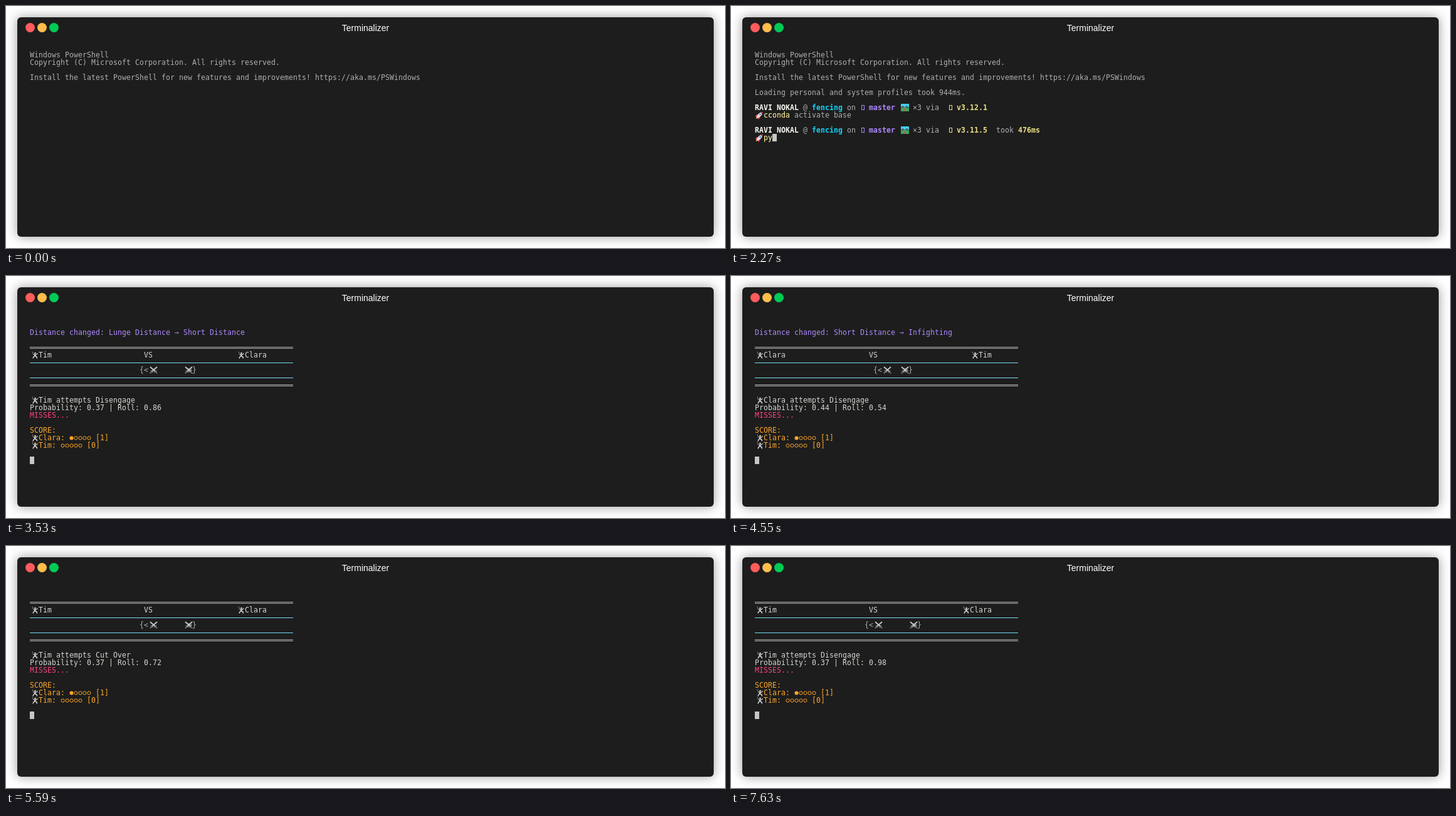
An HTML page with a canvas for the animation above (8 s loop, 1147 px wide and 386 px high).

```html
<!DOCTYPE html>
<html lang="en">
<head>
<meta charset="utf-8">
<title>Terminalizer</title>
<style>
html, body { margin: 0; width: 100%; height: 100%; overflow: hidden; background: #fff; }
#window { position: absolute; left: 18px; top: 18px; width: 1111px; height: 350px;
  border-radius: 6px; background: #1d1d1d; box-shadow: 0 0 18px rgba(0, 0, 0, .4); }
#title { position: absolute; top: 9px; width: 100%; text-align: center; color: #fff;
  font: 14px/16px "Liberation Sans", Arial, sans-serif; }
i { position: absolute; top: 9px; width: 15px; height: 15px; border-radius: 50%; }
canvas { position: absolute; left: 0; top: 0; }
</style>
</head>
<body>
<div id="window">
  <div id="title">Terminalizer</div>
  <i style="left:13px;background:#ff5c5c"></i>
  <i style="left:32px;background:#ffbd4c"></i>
  <i style="left:51px;background:#00ca56"></i>
</div>
<canvas width="1147" height="386"></canvas>
<script>
const ctx = document.querySelector('canvas').getContext('2d');
const LOOP = 8000, CELL = 7, LINE = 12, LEFT = 38, TOP = 72;
const FONT = '11.5px "DejaVu Sans Mono", "Noto Sans Mono", monospace';
const GREY = '#afafaf', WHITE = '#d5d5d0', BRIGHT = '#f9f9f4', CYAN = '#75dff2', SKY = '#0fd2fa',
  PURPLE = '#ae89fe', YELLOW = '#ebdf86', ORANGE = '#ffa727', RED = '#fc4384', GREEN = '#b3e33b';
const USER = 'RAVI NOKAL', ONE = 'Clara', TWO = 'Tim';

function shape(color, ...pts) {
  ctx.fillStyle = color;
  ctx.beginPath();
  pts.forEach(p => ctx.lineTo(...p));
  ctx.fill();
}

function stroke(color, width, ...pts) {
  ctx.strokeStyle = color;
  ctx.lineWidth = width;
  ctx.beginPath();
  pts.forEach(p => ctx.lineTo(...p));
  ctx.stroke();
}

function disc(color, x, y, rx, ry = rx) {
  ctx.fillStyle = color;
  ctx.beginPath();
  ctx.ellipse(x, y, rx, ry, 0, 0, 7);
  ctx.fill();
}

// Glyphs drawn by hand, with the cell's top left corner as the zero point
const glyphs = {
  '═': c => { ctx.fillStyle = c; ctx.fillRect(0, 5, CELL, 1); ctx.fillRect(0, 7, CELL, 1); },
  '─': c => { ctx.fillStyle = c; ctx.fillRect(0, 6, CELL, 1); },
  '▯': c => { ctx.strokeStyle = c; ctx.lineWidth = 1; ctx.strokeRect(2.5, 2.5, 4, 7); },
  '█': c => { ctx.fillStyle = c; ctx.fillRect(0, 0, CELL, LINE); },
  '●': c => disc(c, 3.5, 6.5, 3),
  '○': c => {
    ctx.strokeStyle = c;
    ctx.lineWidth = 1;
    ctx.beginPath();
    ctx.arc(3.5, 6.5, 2.6, 0, 7);
    ctx.stroke();
  },
  '🚀': () => {
    ctx.translate(7.5, 6);
    ctx.rotate(Math.PI / 4);
    shape('#e0384f', [-1.5, 0], [-4, 3], [-3.5, 6], [3.5, 6], [4, 3], [1.5, 0]);
    shape('#ffb02e', [-1.5, 5], [0, 8.5], [1.5, 5]);
    disc('#dedee6', 0, 0, 2.6, 6);
    shape('#e0384f', [-1.8, -4], [0, -7.5], [1.8, -4]);
    disc('#3f6f91', 0, -1.5, 1.2);
  },
  '🏞': () => {
    shape('#43cdf2', [2, 0], [15, 0], [15, 12], [2, 12]);
    shape('#4d5560', [2, 6], [5, 3], [8, 6], [11, 3], [15, 6], [15, 8], [2, 8]);
    shape('#35ad5b', [2, 7], [6, 6], [11, 6], [15, 7], [15, 12], [2, 12]);
    shape('#a06c60', [8, 6], [9, 6], [11, 12], [6, 12]);
  },
  '🤺': () => {
    disc('#d8c8b8', 8.5, 3.2, 1.5);
    stroke('#dedede', 2, [8.5, 5], [8, 8]);
    stroke('#dedede', 1.4, [5, 11.5], [6, 9], [8, 7.5], [11, 9], [11.5, 11.5]);
    stroke('#dedede', 1.2, [12.5, 3], [10.5, 5.5], [8, 5.5], [5.5, 5]);
    stroke('#a5a5aa', .8, [5.5, 5], [4, .5]);
  },
  '⚔': () => {
    for (const s of [-1, 1]) {
      const x = n => 8.5 + s * n;
      stroke('#c9c9ce', 1.8, [x(-5.5), 1], [x(3.5), 9]);
      stroke('#77777f', 1.4, [x(1.2), 10], [x(4.8), 6.5]);
      stroke('#77777f', 1.8, [x(3.5), 9], [x(5.8), 11.5]);
    }
  }
};
const wide = '🚀🏞🤺⚔';

function put(row, col, text, color = GREY, bold = false) {
  ctx.font = (bold ? 'bold ' : '') + FONT;
  for (const ch of text) {
    const x = LEFT + col * CELL, y = TOP + row * LINE;
    if (glyphs[ch]) {
      ctx.save();
      ctx.translate(x, y);
      glyphs[ch](color);
      ctx.restore();
    } else {
      ctx.fillStyle = color;
      ctx.fillText(ch, x, y + 10);
    }
    col += wide.includes(ch) && ch !== ' ' ? 2 : 1;
  }
}

const cursor = (row, col) => put(row, col, '█', '#c7c7c7');

function banner() {
  put(0, 0, 'Windows PowerShell');
  put(1, 0, 'Copyright (C) Microsoft Corporation. All rights reserved.');
  put(3, 0, 'Install the latest PowerShell for new features and improvements! https://aka.ms/PSWindows');
}

function prompt(row, version, took) {
  put(row, 0, USER, BRIGHT, true);
  put(row, 11, '@');
  put(row, 13, 'fencing', SKY, true);
  put(row, 21, 'on');
  put(row, 24, '▯ master', PURPLE, true);
  put(row, 33, '🏞 ×3 via');
  put(row, 44, '▯ ' + version, YELLOW, true);
  if (took) {
    put(row, 55, 'took');
    put(row, 60, took, YELLOW, true);
  }
  put(row + 1, 0, '🚀');
}

function command(row, text) {
  const [word] = text.split(' ');
  put(row, 2, text);
  put(row, 2, word, YELLOW);
}

function shell(first, second, waiting) {
  banner();
  put(5, 0, 'Loading personal and system profiles took 944ms.');
  prompt(7, 'v3.12.1');
  command(8, first);
  if (second) {
    prompt(10, 'v3.11.5', '476ms');
    command(11, second);
    cursor(11, 2 + second.length);
  } else if (waiting) cursor(9, 0);
  else cursor(8, 2 + first.length);
}

const gaps = { Lunge: [22, 37], Short: [25, 35], Infighting: [27, 33] };

function duel(fighter, rival, range, move, odds, roll, change, hit) {
  let row = 1;
  if (change) {
    put(1, 0, 'Distance changed: ' + change, PURPLE);
    row = 3;
  }
  const rule = '═'.repeat(60), thin = '─'.repeat(60);
  const [a, b] = gaps[range];
  put(row, 0, rule, GREY);
  put(row + 1, 0, '🤺' + fighter, WHITE);
  put(row + 1, 26, 'VS', WHITE);
  put(row + 1, 52 - rival.length, '🤺' + rival, WHITE);
  put(row + 2, 0, thin, CYAN);
  put(row + 3, a, '{<⚔');
  put(row + 3, b + 1, '>}');
  put(row + 3, b, '⚔');
  put(row + 4, 0, thin, CYAN);
  put(row + 5, 0, rule, GREY);
  put(row + 7, 0, `🤺${fighter} attempts ${move}`, WHITE);
  put(row + 8, 0, `Probability: ${odds} | Roll: ${roll}`, WHITE);
  put(row + 9, 0, hit ? 'HITS!' : 'MISSES...', hit ? GREEN : RED);
  put(row + 11, 0, 'SCORE:', ORANGE);
  put(row + 12, 0, `🤺${ONE}: ●○○○○ [1]`, ORANGE);
  put(row + 13, 0, `🤺${TWO}: ○○○○○ [0]`, ORANGE);
  cursor(row + 15, 0);
}

const scenes = [
  [0, banner],
  [1130, () => shell('co')],
  [1150, () => shell('ccon')],
  [1210, () => shell('cconda')],
  [1360, () => shell('cconda activate')],
  [1450, () => shell('cconda activate base')],
  [1650, () => shell('cconda activate base', '', true)],
  [2270, () => shell('cconda activate base', 'py')],
  [2420, () => shell('cconda activate base', 'python main.py')],
  [2510, () => cursor(0, 0)],
  [2530, () => duel(ONE, TWO, 'Lunge', 'Lunge', '0.52', '0.31', '', true)],
  [3530, () => duel(TWO, ONE, 'Short', 'Disengage', '0.37', '0.86', 'Lunge Distance → Short Distance')],
  [4550, () => duel(ONE, TWO, 'Infighting', 'Disengage', '0.44', '0.54', 'Short Distance → Infighting')],
  [4570, () => duel(ONE, TWO, 'Short', 'Disengage', '0.44', '0.54', 'Infighting → Short Distance')],
  [5590, () => duel(TWO, ONE, 'Short', 'Cut Over', '0.37', '0.72')],
  [6590, () => duel(ONE, TWO, 'Lunge', 'Cut Over', '0.37', '0.87', 'Short Distance → Lunge Distance')],
  [6610, () => duel(ONE, TWO, 'Short', 'Cut Over', '0.37', '0.87')],
  [7630, () => duel(TWO, ONE, 'Short', 'Disengage', '0.37', '0.98')]
];

function draw() {
  const t = performance.now() % LOOP;
  ctx.clearRect(0, 0, 1147, 386);
  scenes.findLast(([start]) => start <= t)[1]();
  requestAnimationFrame(draw);
}
draw();
</script>
</body>
</html>
```
